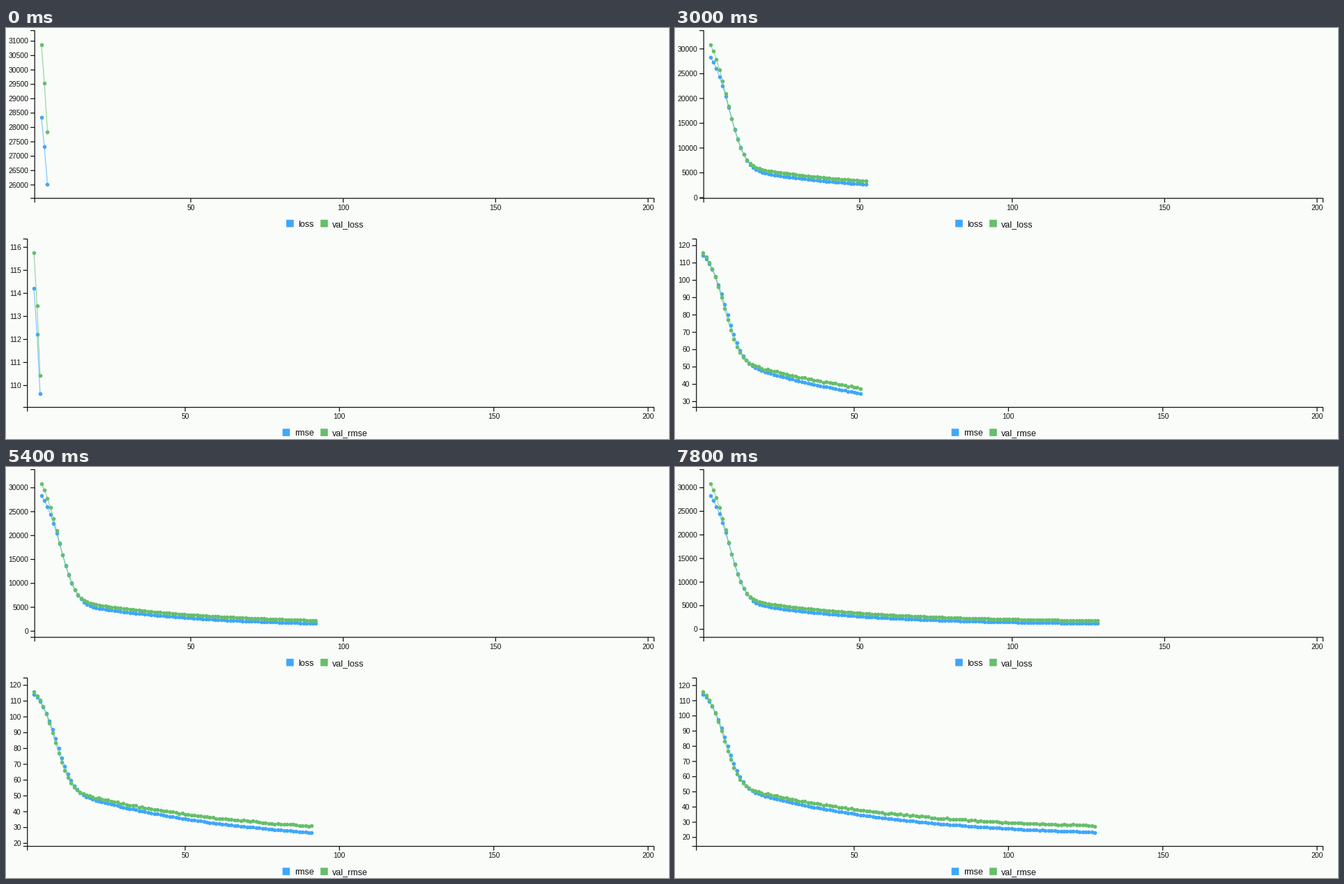
Write a matplotlib script that moves like this. It is 951 by 589 pixels and loops after 8 s.

```python
import math
import matplotlib.pyplot as plt
import numpy as np
from matplotlib.animation import FuncAnimation
from matplotlib.patches import Rectangle

W, H, DPI = 951, 589, 64
PT = 72 / DPI  # points per pixel
FRAMES, INTERVAL, REFRESH = 80, 100, 300
BLUE, GREEN, BACK, INK = "#3fa7fb", "#66bf6a", "#fafcfa", "#111111"
RIGHT = 929.5
plt.rcParams["font.family"] = "Liberation Sans"
plt.rcParams["path.snap"] = False

EPOCHS = np.arange(1, 129)
erf = np.vectorize(math.erf)


def learning_curve(floor, tail, decay, drop, middle, width, noise=0):
    """An S-shaped early drop on top of a slow exponential decay."""
    slow = floor + tail * np.exp(-(EPOCHS - 1) / decay)
    early = drop * (1 - erf((EPOCHS - middle) / (width * math.sqrt(2)))) / 2
    wobble = np.random.default_rng(3).uniform(-noise, noise, len(EPOCHS))
    return slow + early + wobble * (EPOCHS > 18)


loss = learning_curve(1010, 6021, 39.5, 23000, 7.25, 4.3)
val_loss = learning_curve(1550, 6088, 41.5, 25690, 6.5, 4.2)
rmse = learning_curve(20, 40.3, 51, 55.7, 8.6, 4.1, noise=0.1)
val_rmse = learning_curve(24.5, 35.8, 52, 57.8, 7.8, 3.9, noise=0.45)

fig = plt.figure(figsize=(W / DPI, H / DPI), dpi=DPI, facecolor=BACK)
ax = fig.add_axes([0, 0, 1, 1])
ax.set(xlim=(0, W), ylim=(H, 0))
ax.axis("off")


def stroke(x, y):
    return ax.plot(x, y, color=INK, lw=1.25 * PT, solid_capstyle="butt",
                   solid_joinstyle="miter", snap=False)[0]


def label(x, y, text="", size=10.4, **kw):
    return ax.text(x, y, text, fontsize=size * PT, color=INK, va="baseline", **kw)


def nice_step(span, count=10):
    step = 10 ** math.floor(math.log10(span / count))
    ratio = count / span * step
    for limit, factor in ((0.15, 10), (0.35, 5), (0.75, 2)):
        if ratio <= limit:
            return step * factor
    return step


class Chart:
    def __init__(self, left, top, bottom, x50, x200, legend, data):
        self.left, self.top, self.bottom = left, top, bottom
        self.data = data
        per_epoch = (x200 - x50) / 150
        self.x = x50 + (EPOCHS - 50) * per_epoch

        stroke([left - 6, left, left, left - 6], [top, top, bottom, bottom])
        stroke([left, left, RIGHT, RIGHT],
               [bottom + 6, bottom, bottom, bottom + 6])
        for epoch in range(50, 201, 50):
            x = x50 + (epoch - 50) * per_epoch
            stroke([x, x], [bottom, bottom + 6])
            label(x, bottom + 16.6, str(epoch), ha="center")

        middle = bottom + 36
        for color, (box_x, text_x, name) in zip((BLUE, GREEN), legend):
            ax.add_patch(Rectangle((box_x, middle - 5.3), 10.6, 10.6,
                                   fc=color, lw=0, snap=False))
            label(text_x, middle + 4.7, name, 12.5)

        self.curves = []
        for color in (BLUE, GREEN):
            line, = ax.plot([], [], color=color, lw=1.1 * PT, alpha=0.7)
            dots, = ax.plot([], [], "o", color=color, ms=5.6 * PT, mew=0, snap=False)
            self.curves.append((line, dots))
        self.ticks = [(stroke([], []), label(left - 9, 0, ha="right"))
                      for _ in range(18)]

    def show(self, count):
        shown = [values[:count] for values in self.data]
        low, high = np.min(shown), np.max(shown)
        scale = (self.bottom - self.top - 40) / (high - low)

        def to_y(value):
            return self.bottom - 20 - (value - low) * scale

        for artists, values in zip(self.curves, shown):
            for artist in artists:
                artist.set_data(self.x[:count], to_y(values))

        pad = 20 / scale
        step = nice_step(high - low + 2 * pad)
        first = math.ceil((low - pad) / step)
        last = math.floor((high + pad) / step)
        for value, (mark, text) in enumerate(self.ticks, first):
            y = to_y(value * step)
            mark.set_data([self.left - 6, self.left], [y, y])
            text.set_y(y + 3.6)
            text.set_text(f"{value * step:.0f}")
            mark.set_visible(value <= last)
            text.set_visible(value <= last)


charts = [
    Chart(41.2, 3.7, 244.1, 265, 921,
          [(402.1, 419, "loss"), (451.1, 468, "val_loss")], (loss, val_loss)),
    Chart(30.7, 302.4, 543.6, 257, 921,
          [(396.6, 414, "rmse"), (451.1, 468, "val_rmse")], (rmse, val_rmse)),
]


def update(frame):
    refresh = frame * INTERVAL // REFRESH
    epochs = np.interp(refresh, [0, 3, 10, 21, 26], [3, 18, 52, 105, 128])
    for chart in charts:
        chart.show(int(round(epochs)))
    return []


anim = FuncAnimation(fig, update, frames=FRAMES, interval=INTERVAL,
                     repeat=True, repeat_delay=0, blit=False)
plt.show()
```
